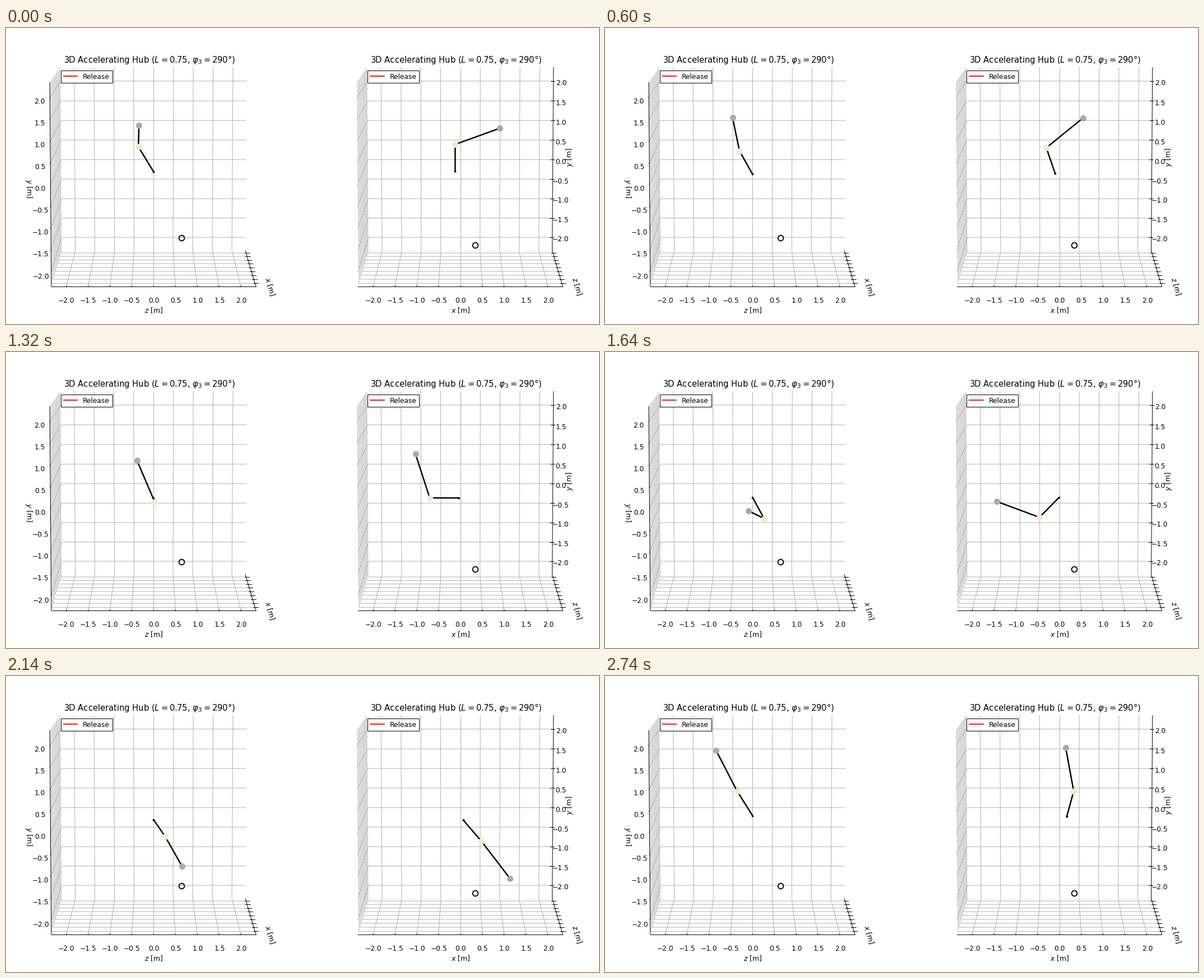
A matplotlib script that plays this animation: 1058 by 529 pixels, repeating every 2760 ms.

```python
import numpy as np
import matplotlib.pyplot as plt
from matplotlib.animation import FuncAnimation
from matplotlib.collections import LineCollection
from matplotlib.patches import Rectangle

W, H = 1058, 529
FRAMES, STEP = 138, 20

# Camera: tilted slightly downwards, mild perspective
LIM = 2.34375
SCALE = 74.18
DIST = 42.61
TILT = np.radians(7.5)
CX_LEFT, CX_RIGHT, CY = 262.8, 810.3, 256.3
TICKS = np.arange(-2, 2.1, 0.5)

# Two-link mechanism: inner arm turns close to a plane inclined by SLOPE
ARM, TETHER = 0.705, 1.153
SLOPE = np.radians(30)
E1 = np.array([1, 0, 0])
E2 = np.array([0, np.cos(SLOPE), -np.sin(SLOPE)])
E3 = np.array([0, np.sin(SLOPE), np.cos(SLOPE)])
RELEASE = np.array([0.347, -1.678, 0.683])


def project(u, v, w, cx):
    """Right, up and towards-viewer coordinates to pixels."""
    s, c = np.sin(TILT), np.cos(TILT)
    k = SCALE / (1 - (w * c + v * s) / DIST)
    return cx + k * u, CY - k * (v * c - w * s)


def view_left(p):
    return project(p[2], p[1], -p[0], CX_LEFT)


def view_right(p):
    return project(p[0], p[1], p[2], CX_RIGHT)


def spline(t, y, slope):
    """Cubic spline with a given start slope and a natural end."""
    t, y = np.array(t), np.array(y)
    n, h = len(t), np.diff(t)
    d = np.diff(y) / h
    a, b = np.zeros((n, n)), np.zeros(n)
    a[0, :2] = 2 * h[0], h[0]
    b[0] = 6 * (d[0] - slope)
    for i in range(1, n - 1):
        a[i, i - 1:i + 2] = h[i - 1], 2 * (h[i - 1] + h[i]), h[i]
        b[i] = 6 * (d[i] - d[i - 1])
    a[-1, -1] = 1
    m = np.linalg.solve(a, b)

    def value(x):
        i = int(np.clip(np.searchsorted(t, x) - 1, 0, n - 2))
        p, q = t[i + 1] - x, x - t[i]
        return ((m[i] * p**3 + m[i + 1] * q**3) / (6 * h[i])
                + (y[i] / h[i] - m[i] * h[i] / 6) * p
                + (y[i + 1] / h[i] - m[i + 1] * h[i] / 6) * q)
    return value


T_ARM = [0, 0.6, 0.88, 1.32, 1.64, 2.14, 2.74]
T_BALL = [0, 0.6, 0.88, 1.32, 1.64, 2.04, 2.14, 2.74]
hub_x = spline(T_ARM, [-.128, -.101, -.074, -.034, -.007, .067, .175], 0.03)
hub_y = spline(T_ARM, [.016, -.050, -.060, -.055, -.041, -.009, .075], -0.17)
arm_turn = spline(T_ARM, [90, 107.9, 130.3, 180.7, 227.9, 308.2, 436], 0)
arm_lift = spline(T_ARM, [-1.1, 2.1, 2.2, 2, 1.1, 0.7, -2.9], 6)
ball_turn = spline(T_BALL, [17.4, 38.2, 59.9, 107.8, 155.3, 272.5, 305.9,
                            459.7], 5)
ball_lift = spline(T_BALL, [10.1, 10.2, 12, 7.7, -7.8, -12.5, -2.7, 3.5], 0)


def heading(turn, lift):
    a, b = np.radians([turn, lift])
    return np.cos(b) * (np.cos(a) * E1 + np.sin(a) * E2) + np.sin(b) * E3


def pose(t):
    hub = np.array([hub_x(t), hub_y(t), 0])
    elbow = hub + ARM * heading(arm_turn(t), arm_lift(t))
    ball = elbow + TETHER * heading(ball_turn(t), ball_lift(t))
    return hub, elbow, ball


fig = plt.figure(figsize=(12, 6), dpi=88.16667, facecolor="white")
ax = fig.add_axes([0, 0, 1, 1])
ax.set_xlim(-0.5, W - 0.5)
ax.set_ylim(H - 0.5, -0.5)
ax.axis("off")


def lines(segments, cx, color, width=0.8, z=1):
    pts = [[project(*p, cx) for p in seg] for seg in segments]
    ax.add_collection(LineCollection(pts, colors=color, linewidths=width,
                                     zorder=z, capstyle="projecting"))


def label(x, y, text, size=10, va="center", **kw):
    ax.text(x, y, text, fontsize=size, ha="center", va=va, **kw)


def number(v):
    return f"{v:.1f}".replace("-", "\u2212")


def draw_box(cx, across, depth, upright_left):
    m = LIM
    grid = []
    for k in TICKS:
        grid.append([(k, m, -m), (k, -m, -m), (k, -m, m)])
        grid.append([(m, k, -m), (-m, k, -m), (-m, k, m)])
        grid.append([(m, -m, k), (-m, -m, k), (-m, m, k)])
    lines(grid, cx, "#b0b0b0")

    axes = [[(-m, -m, m), (m, -m, m)], [(m, -m, -m), (m, -m, m)]]
    for k in TICKS:
        axes.append([(k, -m, m - 0.078), (k, -m, m + 0.039)])
        axes.append([(m - 0.039, -m, k), (m + 0.078, -m, k)])
    if upright_left:
        axes.append([(-m, -m, m), (-m, m, m)])
        axes += [[(-m, k, m - 0.078), (-m, k, m + 0.039)] for k in TICKS]
    else:
        lines([[(-m, -m, -m), (m, -m, -m)]], cx, "#ececec")
        axes.append([(m, -m, -m), (m, m, -m)])
        axes += [[(m - 0.065, k, -m), (m + 0.039, k, -m)] for k in TICKS]
    lines(axes, cx, "black", z=2)

    for k in TICKS:
        label(cx + 0.5 + 78.1 * k, 486.7, number(k))
        if upright_left:
            label(60.6 - 0.5 * k, 287.3 - 78.1 * k, number(k))
        else:
            y = project(m, k, -m, cx)[1]
            label(989.5 + 0.4 * k, y + 3.9, number(k))

    label(cx, 504.2, f"${across}$ [m]")
    label(cx + 207.5, 461.5, f"${depth}$ [m]", rotation=-74)
    if upright_left:
        label(40, 286, "$y$ [m]", rotation=-90)
    else:
        label(1004.8, 230.5, "$y$ [m]", rotation=90)

    label(cx - 7.5, 61.4, "3D Accelerating Hub ($L=0.75$, "
          r"$\varphi_3=290\degree$)", 12, va="baseline")
    x = cx - 165.4
    ax.add_patch(Rectangle((x, 75.3), 92, 22, fc="white", ec="black", lw=0.8,
                           zorder=8))
    ax.plot([x + 5, x + 29.4], [85.7, 85.7], color="red", lw=1.5, zorder=9)
    ax.text(x + 39.2, 90.2, "Release", fontsize=10, zorder=9)


class Mechanism:
    def __init__(self, view):
        self.view = view
        self.rod, = ax.plot([], [], color="black", lw=2, zorder=4)
        self.hub = self.dot("black", 2)
        self.elbow = self.dot("bisque", 8)
        self.ball = self.dot("darkgray", 8)
        x, y = view(RELEASE)
        ax.plot([x], [y], "o", ms=8, mfc="none", mec="black", mew=1.5,
                zorder=3)

    def dot(self, color, size):
        return ax.plot([], [], "o", color=color, ms=size, mew=1, zorder=5)[0]

    def place(self, points):
        xy = [self.view(p) for p in points]
        self.rod.set_data(*zip(*xy))
        for mark, (x, y) in zip((self.hub, self.elbow, self.ball), xy):
            mark.set_data([x], [y])
        return [self.rod, self.hub, self.elbow, self.ball]


draw_box(CX_LEFT, "z", "x", True)
draw_box(CX_RIGHT, "x", "z", False)
views = [Mechanism(view_left), Mechanism(view_right)]


def update(i):
    points = pose(i * STEP / 1000)
    return views[0].place(points) + views[1].place(points)


anim = FuncAnimation(fig, update, frames=FRAMES, interval=STEP,
                     repeat=True, repeat_delay=0, blit=False)
plt.show()
```
